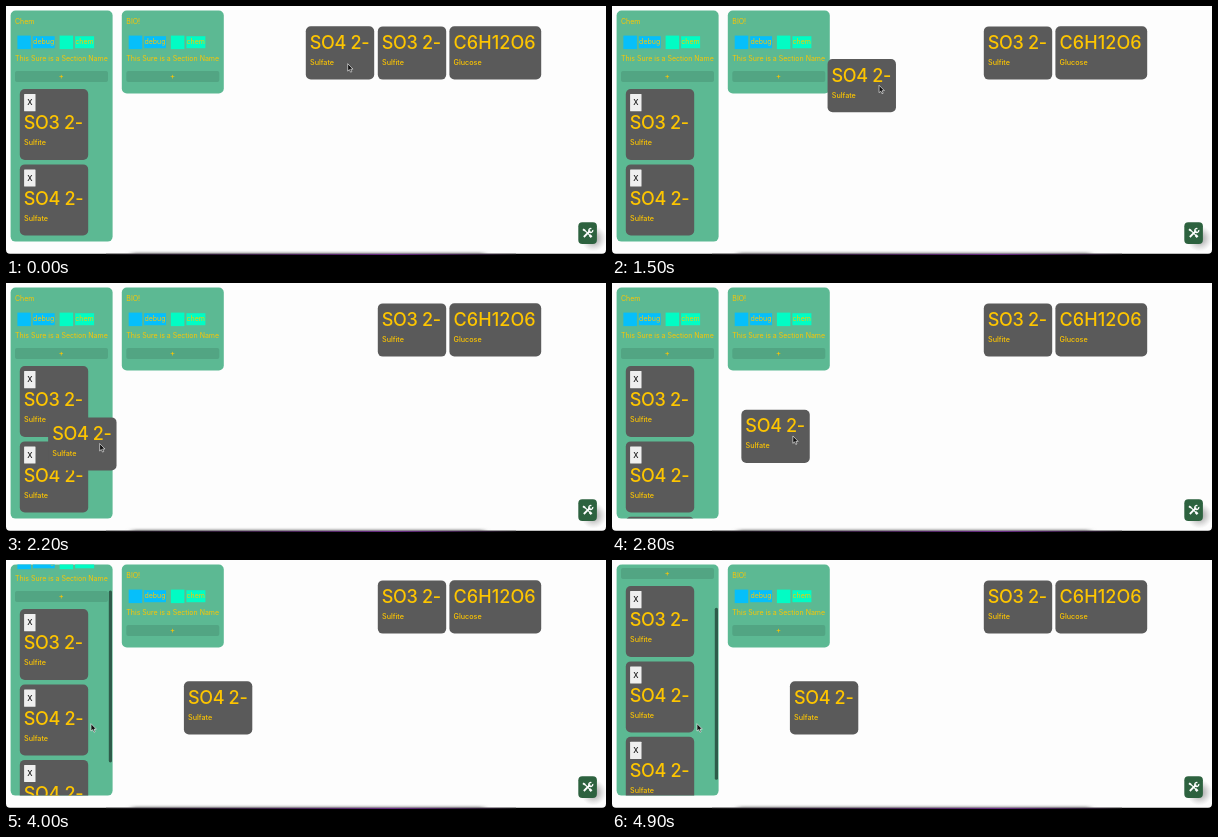
An HTML page for the animation above (5 s loop, 600x249 px).

```html
<!DOCTYPE html>
<html lang="en">
<head>
<meta charset="utf-8">
<title>Drag cards into sections</title>
<style>
  html, body { margin: 0; width: 100%; height: 100%; overflow: hidden; background: #000; }
  svg { display: block; width: 600px; height: 249px; }
  text { font: 7px Inter, "Open Sans", sans-serif; fill: #fdc500; white-space: pre; }
  .big { font-size: 18px; font-weight: 500; letter-spacing: -.33px; }
  .wide { letter-spacing: .1px; }
  .label { font-size: 7.2px; font-weight: 500; }
  .mid { text-anchor: middle; font-size: 7.5px; font-weight: 500; }
  .key { fill: #111; }
</style>
</head>
<body>
<svg id="stage" viewBox="0 0 600 249"></svg>
<script>
const LOOP = 5000, STEP = 100;
const GREEN = '#5cb993', BAR = '#52a583', GREY = '#5a5a5a', BLUE = '#06bffa', MINT = '#02fcc4';

const rect = (x, y, w, h, fill, r = 0) =>
  `<rect x="${x}" y="${y}" width="${w}" height="${h}" rx="${r}" fill="${fill}"/>`;
const text = (x, y, s, cls = '') => `<text x="${x}" y="${y}" class="${cls}">${s}</text>`;
const group = (id, x, y, body) => `<g id="${id}" transform="translate(${x} ${y})">${body}</g>`;

const card = (formula, name, w = 68.4, cls = 'big') =>
  rect(0, 0, w, 53.2, GREY, 5) + text(4, 22.7, formula, cls) + text(4.2, 38.6, name, 'label');

const listed = (id, row, formula, name) => group(id, 13.8, 83 + 75.4 * row,
  rect(0, 0, 68.4, 71, GREY, 5) +
  rect(4.3, 5, 11.4, 17.2, '#efefef', .5) + text(10, 16.3, 'X', 'mid key') +
  text(4, 40.4, formula, 'big') + text(4.2, 56.2, name, 'label'));

const tag = (x, color, w, name) =>
  rect(x, 29.6, 13.5, 13.5, color) + rect(x + 15.5, 30.2, w, 12, color) + text(x + 15.7, 38.3, name);

const header = title =>
  text(9, 17.6, title) + tag(11.4, BLUE, 21.8, 'debug') + tag(53.6, MINT, 19, 'chem') +
  text(9, 54.6, 'This Sure is a Section Name') +
  rect(9, 65, 93, 11, BAR, 2) + text(55.3, 73.2, '+', 'mid');

const tools = `
  <circle cx="587.5" cy="232.5" r="13" fill="url(#shade)"/>
  ${rect(572.3, 216.3, 18.6, 21.6, '#2d623f', 4)}
  <g stroke="#fff" fill="none">
    <path d="M578.3 223.8l6.6 6.6" stroke-width="1.2"/>
    <path d="M583.6 229.2l2 2" stroke-width="2.4"/>
    <path d="M584.2 224.6l-6.4 6.4" stroke-width="1.8"/>
    <path d="M585.4 222.6a2 2 0 1 0 1.3 1.4" stroke-width="1.3"/>
    <path d="M577 223.2l2 1.6" stroke-width="1.8"/>
  </g>`;

const pointer = `<path d="M0 0V7.4L1.7 5.9L2.9 8.5L4.1 8L3 5.4H5.3Z"
  fill="#111" stroke="#fff" stroke-width=".6" stroke-linejoin="round"/>`;

const stage = document.getElementById('stage');
stage.innerHTML = `
  <defs>
    <clipPath id="panel"><rect x="4.6" y="4.6" width="102" height="231" rx="5"/></clipPath>
    <clipPath id="page"><rect y="-10" width="600" height="257.8" rx="4"/></clipPath>
    <filter id="soft" x="-10%" y="-300%" width="120%" height="700%"><feGaussianBlur stdDeviation="3 1.4"/></filter>
    <radialGradient id="shade">
      <stop offset="0" stop-color="#555" stop-opacity=".6"/>
      <stop offset=".5" stop-color="#888" stop-opacity=".4"/>
      <stop offset="1" stop-color="#aaa" stop-opacity="0"/>
    </radialGradient>
    <linearGradient id="edge">
      <stop offset="0" stop-color="#111"/><stop offset=".4" stop-color="#40204c"/>
      <stop offset=".7" stop-color="#6a2a86"/><stop offset="1" stop-color="#111"/>
    </linearGradient>
  </defs>
  <g clip-path="url(#page)">
    ${rect(0, -10, 600, 258, '#fdfdfd')}
    <g filter="url(#soft)">${rect(126, 247, 352, 4, '#777')}</g>
  </g>
  ${rect(100, 247.8, 410, 1.2, 'url(#edge)')}
  <g clip-path="url(#panel)">
    ${rect(4, 4, 103, 232, GREEN)}
    ${group('list', 0, 0, header('Chem') +
      listed('first', 0, 'SO3 2-', 'Sulfite') +
      listed('second', 1, 'SO4 2-', 'Sulfate') +
      listed('third', 2, 'SO4 2-', 'Sulfate'))}
    <rect id="thumb" x="102.8" width="3.2" height="172" rx="1.6" fill="#2e5c4a"/>
  </g>
  ${rect(115.8, 4.6, 102, 82.8, GREEN, 5)}
  ${group('bio', 111.3, 0, header('BIO!'))}
  ${group('sulfite', 371.8, 20.4, card('SO3 2-', 'Sulfite'))}
  ${group('glucose', 443.4, 20.2, card('C6H12O6', 'Glucose', 91.8, 'big wide'))}
  ${tools}
  ${group('drag', 0, 0, card('SO4 2-', 'Sulfate'))}
  ${group('mouse', 0, 0, pointer)}`;

const el = id => document.getElementById(id);
const move = (id, x, y) => el(id).setAttribute('transform', `translate(${x} ${y})`);
const show = (id, on) => el(id).setAttribute('visibility', on ? 'visible' : 'hidden');
const clamp = (v, a, b) => Math.min(b, Math.max(a, v));
const smooth = p => p * p * (3 - 2 * p);
const easeOut = p => 1 - (1 - p) ** 2;

const GRAB = 1300, LAND = 2500, RELEASE = 3000, SCROLL = 3600;
const HOME = { x: 299.8, y: 20.2 }, GRIP = { x: 51.5, y: 26.2 };

// The pointer glides from one stop to the next
const stops = [
  { t: 0, x: 341.7, y: 57.7 },
  { t: 1000, x: 327.7, y: 56.2 },
  { t: GRAB, x: HOME.x + GRIP.x, y: HOME.y + GRIP.y },
  { t: 1800, x: 112, y: 139.7 },
  { t: 2300, x: 91.5, y: 163 },
  { t: LAND, x: 91.5, y: 163 },
  { t: RELEASE, x: 229.4, y: 147.5 },
  { t: 3500, x: 85, y: 163.7 }
];

function pointerAt(t) {
  const i = stops.findIndex(s => s.t > t);
  if (i < 0) return stops[stops.length - 1];
  const a = stops[i - 1], b = stops[i], p = smooth((t - a.t) / (b.t - a.t));
  return { x: a.x + (b.x - a.x) * p, y: a.y + (b.y - a.y) * p };
}

function draw(now) {
  const t = Math.floor((now % LOOP) / STEP) * STEP;
  const mouse = pointerAt(t), held = pointerAt(clamp(t, GRAB, RELEASE));
  const scroll = 57 * easeOut(clamp((t - SCROLL) / 1100, 0, 1));
  move('mouse', mouse.x, mouse.y);
  move('drag', held.x - GRIP.x, held.y - GRIP.y);
  move('list', 0, -scroll);
  el('thumb').setAttribute('y', 5 + scroll * .75);
  show('thumb', t > SCROLL);
  show('third', t >= LAND);
}

const start = performance.now();
function tick() {
  draw(performance.now() - start);
  requestAnimationFrame(tick);
}
tick();
</script>
</body>
</html>
```
